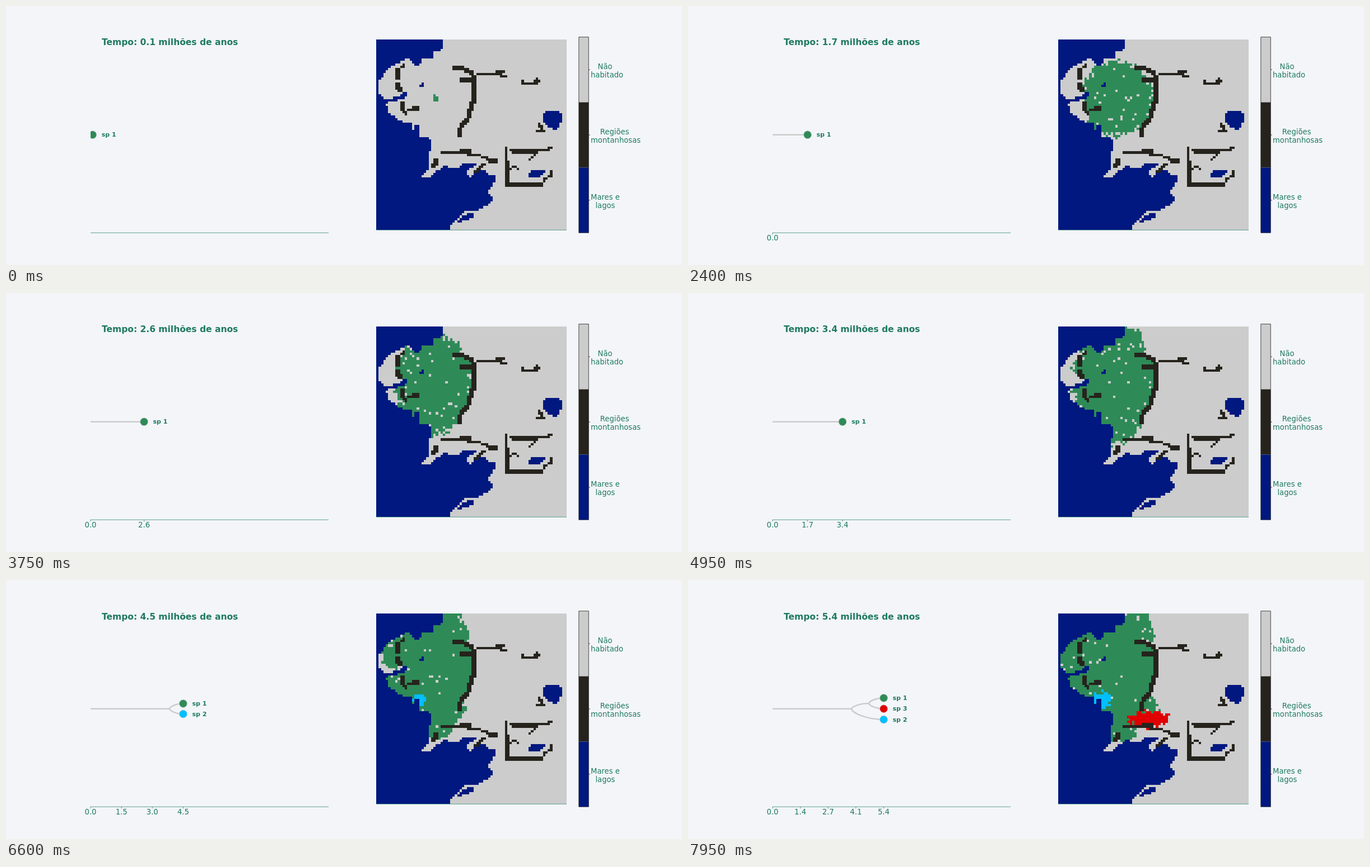
Recreate the animation shown at these times as an HTML page with a canvas. Size 1207 by 464 pixels, loop 8 s.

```html
<!DOCTYPE html>
<html lang="pt">
<head>
<meta charset="utf-8">
<style>
html, body { margin: 0; width: 1207px; height: 464px; overflow: hidden; background: #f3f5f9; }
canvas { position: absolute; left: 661px; top: 60px; width: 340px; height: 341px; image-rendering: pixelated; }
svg { position: absolute; left: 0; top: 0; }
text { font: 13.2px "DejaVu Sans", sans-serif; fill: #1f7a5f; white-space: pre; }
.title { font-size: 15.5px; font-weight: bold; }
.name { font-size: 11px; font-weight: bold; }
.tick { text-anchor: middle; }
.axis { stroke: #1f7a5f; stroke-width: .7; }
.branch { fill: none; stroke: #ccc; stroke-width: 2.6; }
</style>
</head>
<body>
<canvas id="map" width="80" height="80"></canvas>
<svg width="1207" height="464">
  <clipPath id="plot"><path d="M151 40H576V407H151Z"/></clipPath>
  <path class="axis" d="M151 406.3H576M661 401.4H1001"/>
  <g id="bar"></g>
  <g id="tree"></g>
</svg>
<script>
const N = 80, LAND = '#cccccc', SEA = '#00187f', ROCK = '#26231d';
const SPECIES = { 1: '#2e8b57', 2: '#00bfff', 3: '#e00000' };
const $ = id => document.getElementById(id);
const ctx = $('map').getContext('2d');
const rand = n => { const v = Math.sin(n * 12.9898 + 4.1) * 43758.5453; return v - Math.floor(v); };
const eachCell = fn => { for (let y = 0; y < N; y++) for (let x = 0; x < N; x++) fn(x, y, y * N + x); };

// Outlines in map cells; each cell takes the terrain found at its centre
const COAST = new Path2D(`M0 0H28V3L27 5H24V8H19V10L17 11 15 9 13 8 6.5 11 3.5 14 1 18V23L3 25H5L10 23.5 12 22H13V24L8 26H5L4 28H5V31
  L12 35H15V38H16V36H18V41H22L23 43V47H22V54L18 58H22L29 53 30 54H35L37 52H42V53L38 55V57L40 58 43 55H46L47 57H50V59L47 64 49 67 48 69 42 72H37
  L31 78V80H0Z`);
const LAKES = new Path2D(`M19 18H20V20H18ZM71 30H77L78 32 77 37 75 38 71 36 70 33Z
  M67 55H71L69 58H64V56ZM39 73H41V75L34 77V76Z`);
const THIN = new Path2D(`M12 10.5 8 13.5M10.5 29 13 31.5M13 29.5H17V28.5H15M42 14.5H50L51 13.5H54M50 14.5 55 15.5
  M61.5 17V18.5H67L67.5 16M66 17.5H69M68.5 35 69.5 38.5M67 38.5H71
  M35 46.5H40M27 47.5H40M38 48.5H43L46 50 51 50.5M47 51.5H51M46 52 41 56
  M54.5 45V51M56 46.5H71L74 45.5M57 47.5H68M67 48 64 51M56 54.5 58 53.5 60 54.5M70 59.5 73.5 57V55`);
const THICK = new Path2D(`M9 12V17M8.5 18 10 22M11.5 26 11 29M32 11.5Q41 12.5 41 17V25L38.5 33 35.5 37 35 41M35 17H40
  M25.3 50 24 54M55 51V61H70`);

const onLine = (path, width, x, y) => { ctx.lineWidth = width; return ctx.isPointInStroke(path, x + .5, y + .5); };
const terrain = [];
eachCell((x, y, i) => {
  const rock = onLine(THIN, 1.1, x, y) || onLine(THICK, 2.1, x, y);
  const wet = [COAST, LAKES].some(path => ctx.isPointInPath(path, x + .5, y + .5));
  terrain[i] = rock ? ROCK : wet ? SEA : LAND;
});
const isLand = (x, y) => x >= 0 && y >= 0 && x < N && y < N && terrain[y * N + x] === LAND;

// Walking distance of each cell from the first settlers
const dist = new Float32Array(N * N).fill(1e9);
for (let y = 23; y < 26; y++) for (let x = 24; x < 26; x++) if (x - 24 <= y - 23) dist[y * N + x] = 0;
const slow = (x, y) => x > 34 && y < 13 ? 2.4 : x > 31 && y > 40 ? 3 : y > 50 ? 2 : x < 12 ? 1.5 : 1;

for (let changed = true; changed;) {
  changed = false;
  eachCell((x, y, i) => {
    if (!isLand(x, y)) return;
    const cost = slow(x, y) * (.85 + .4 * rand(i));
    for (let dy = -1; dy < 2; dy++) for (let dx = -1; dx < 2; dx++) {
      if (!isLand(x + dx, y + dy) || !isLand(x + dx, y) && !isLand(x, y + dy)) continue;
      const d = dist[i + dy * N + dx] + cost * Math.hypot(dx, dy);
      if (d < dist[i] - 1e-4) { dist[i] = d; changed = true; }
    }
  });
}

const inBlob = (x, y, cx, cy, rx, ry) => Math.hypot((x - cx) / rx, (y - cy) / ry) < .75 + .45 * rand(x * 91 + y * 7);

function settler(x, y, T, step) {
  const i = y * N + x, red = (T - 4.7) / .7, blue = 2.2 + .9 * (T - 3.8);
  if (T > 4.65 && inBlob(x, y, 34 + 3.5 * red, 44, 3 + 5.5 * red, 2.5 + red)) return 3;
  if (T > 3.85 && inBlob(x, y, 17.8, 35.8, blue, blue)) return 2;
  const reach = Math.min(12 * T - .9, 11.1 * T ** .66);
  const depth = reach - dist[i] - Math.min(dist[i], 2) * (rand(i + 7000) - .5);
  const hole = T < .15 ? 0 : depth < 2 ? .2 : depth < 12 ? .055 : .012;
  return depth > 0 && rand(i * 1.37 + step * 311) > hole ? 1 : 0;
}

function drawMap(T, step) {
  eachCell((x, y, i) => {
    const s = terrain[i] === LAND && settler(x, y, T, step);
    ctx.fillStyle = s ? SPECIES[s] : terrain[i];
    ctx.fillRect(x, y, 1, 1);
  });
}

const label = (x, y, s, cls = '') => `<text class="${cls}" x="${x}" y="${y}">${s}</text>`;
const timeX = T => 151 + 36.75 * T;
const curve = (x0, y0, x1, y1) =>
  `M${x0} ${y0}C${x0} ${y0 + .35 * (y1 - y0)} ${x0 + .45 * (x1 - x0)} ${y1} ${x1} ${y1}`;

function drawTree(T) {
  const mid = 230.7, x = timeX(T), a = timeX(3.84), b = timeX(4.68);
  const gap = 18.6 + .8 * (T - 4.5), tips = T > 4.65 ? [1, 3, 2] : T > 3.85 ? [1, 2] : [1];
  const tipY = tips.map((_, i) => mid + gap * (i - (tips.length - 1) / 2));

  let d = `M151 ${mid}H${Math.min(x, a)}`;
  if (tips.length === 2) d += tipY.map(y => curve(a, mid, x, y)).join('');
  if (tips.length === 3) {
    const fork = mid - gap / 2;
    d += curve(a, mid, b, fork) + curve(b, fork, x, tipY[0]) + curve(b, fork, x, tipY[1]) + curve(a, mid, x, tipY[2]);
  }
  const titleY = T < 3.85 ? 70 : 68.6 + 3.2 * (1 - Math.exp(-1.3 * (T - 3.8)));
  let out = label(171, titleY, `Tempo: ${T.toFixed(1)} milhões de anos`, 'title');
  out += `<g clip-path="url(#plot)"><path class="branch" d="${d}"/>`;
  tips.forEach((s, i) => {
    out += `<circle cx="${x}" cy="${tipY[i]}" r="7" fill="${SPECIES[s]}" stroke="#ccc" stroke-width=".7"/>`;
  });
  out += '</g>';
  tips.forEach((s, i) => { out += label(x + 16, tipY[i] + 3.5, 'sp ' + s, 'name'); });

  const count = Math.floor(T + 1e-9);
  for (let i = 0; i < count; i++) {
    const v = count > 1 ? T * i / (count - 1) : 0, tx = timeX(v);
    out += `<path class="axis" d="M${tx} 406v3.5"/>` + label(tx, 420.3, (v + 1e-9).toFixed(1), 'tick');
  }
  $('tree').innerHTML = out;
}

$('bar').innerHTML = [
  [LAND, '   Não', 'habitado'], [ROCK, '    Regiões', 'montanhosas'], [SEA, 'Mares e', '  lagos']
].map(([fill, first, second], i) => {
  const y = 55.6 + 116.9 * i;
  return `<path fill="${fill}" d="M1022.8 ${y}h17.5v116.9h-17.5z"/><path stroke="#222" stroke-width=".8" d="M1040 ${y + 58.5}h3"/>` +
    label(1044, y + 57.8, first) + label(1044, y + 72.3, second);
}).join('') + '<path fill="none" stroke="#222" stroke-width=".8" d="M1022.8 55.6h17.5v350.7h-17.5z"/>';

let shown = -1;
function frame() {
  const step = Math.floor(performance.now() % 8000 / 150);
  if (step !== shown) {
    const T = (step + 1) / 10;
    drawMap(T, step);
    drawTree(T);
    shown = step;
  }
  requestAnimationFrame(frame);
}
frame();
</script>
</body>
</html>
```
